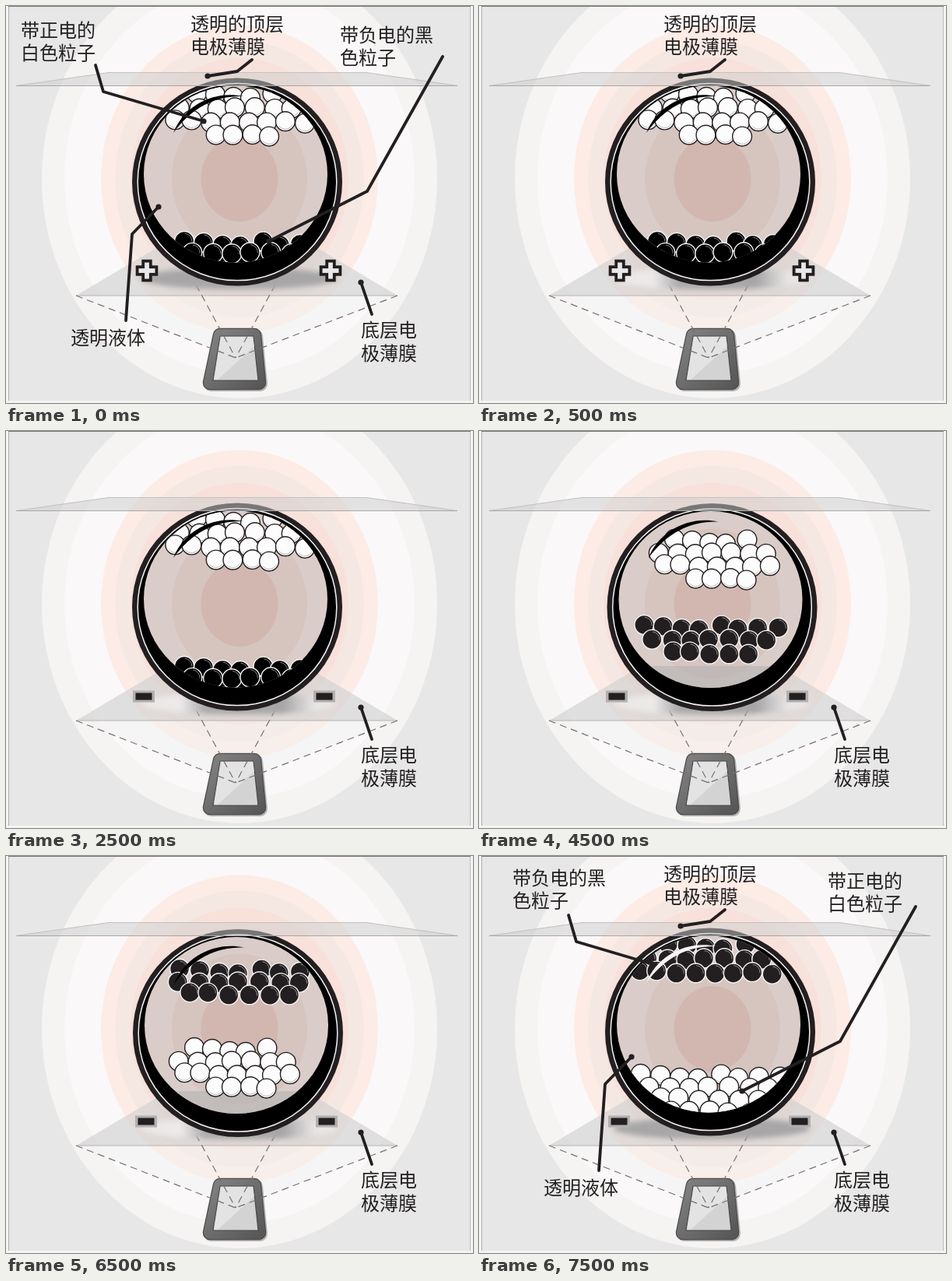
These frames come from a looping animation (600 px wide and 510 px high, 8000 ms). An HTML page with a canvas:

```html
<!DOCTYPE html>
<html lang="zh-CN">
<head>
<meta charset="utf-8">
<title>电子墨水微胶囊</title>
<style>
html, body { margin: 0; width: 100%; height: 100%; overflow: hidden; background: #f4f4f4; }
canvas { display: block; width: 600px; height: 510px; }
</style>
</head>
<body>
<canvas id="stage" width="600" height="510"></canvas>
<script>
const g = document.getElementById('stage').getContext('2d');
const INK = '#231f20';
const LOOP = 8000;

// Seeded noise in -1..1
const noise = n => {
  const v = Math.sin(n * 127.1 + 11.7) * 43758.5453;
  return (v - Math.floor(v)) * 2 - 1;
};

// Loose rows of particles, one count per row, each row centred on x
function heap(x, y, counts, { pitch = 24, gap = 17, lean = 0 } = {}) {
  return counts.flatMap((n, row) => Array.from({ length: n }, (_, i) => ({
    x: x + row * lean + (i - (n - 1) / 2) * pitch + noise(row * 17 + i) * 2.5,
    y: y + row * gap + noise(row * 31 + i + 5) * 4
  })));
}

const shift = (pts, dx, dy) => pts.map(p => ({ x: p.x + dx, y: p.y + dy }));

const whiteMid = heap(296, 141, [5, 7, 7, 4], { pitch: 23, lean: 5 });
const blackMid = heap(297, 251, [8, 7, 5], { pitch: 24.5, gap: 18 });
const START = {
  white: heap(292, 114, [5, 7, 8, 4], { lean: 4, gap: 18 }),
  black: heap(303, 304, [7, 6], { pitch: 25, gap: 14 }),
  sign: 'plus', packed: true
};
const SCENES = [
  { at: 0, ...START, labels: 'all' },
  { at: 500, ...START, labels: 'top' },
  { at: 1500, ...START, labels: 'bottom' },
  { at: 2500, ...START, sign: 'minus', labels: 'bottom' },
  { at: 4500, white: whiteMid, black: blackMid, sign: 'minus', labels: 'bottom', dx: 2.5, dy: 0.5 },
  { at: 5500, white: shift(whiteMid, -5, 54), black: shift(blackMid, 0, -54),
    sign: 'minus', labels: 'bottom', dx: 1.5, dy: 1 },
  { at: 6500, white: shift(whiteMid, -9, 107),
    black: heap(300, 147, [7, 7, 6], { pitch: 26, gap: 16 }),
    sign: 'minus', signDx: 3, labels: 'bottom', dx: 1, dy: 1.5 },
  { at: 7500, white: heap(296, 282, [8, 7, 6, 5], { pitch: 25.5, gap: 16 }),
    black: heap(291, 115, [5, 7, 8], { pitch: 24.5, gap: 18 }),
    sign: 'minus', signDx: 3, labels: 'all', swapped: true }
];

function trace(pts, close) {
  g.beginPath();
  for (let i = 0; i < pts.length; i += 2) g.lineTo(pts[i], pts[i + 1]);
  if (close) g.closePath();
}

function poly(pts, fill, stroke, width = 1) {
  trace(pts, true);
  if (fill) { g.fillStyle = fill; g.fill(); }
  if (stroke) { g.strokeStyle = stroke; g.lineWidth = width; g.stroke(); }
}

function line(pts, color, width, dash = []) {
  trace(pts);
  g.strokeStyle = color;
  g.lineWidth = width;
  g.setLineDash(dash);
  g.stroke();
  g.setLineDash([]);
}

function oval(x, y, rx, ry, fill) {
  g.beginPath();
  g.ellipse(x, y, rx, ry, 0, 0, Math.PI * 2);
  g.fillStyle = fill;
  g.fill();
}

function box(x, y, w, h, fill) {
  g.fillStyle = fill;
  g.fillRect(x - w / 2, y - h / 2, w, h);
}

const ring = (r, color) => oval(300, 222, r, r * 1.11, color);

function backdrop() {
  box(300, 255, 600, 510, '#f4f4f4');
  box(300, 253.5, 594, 507, '#e7e7e7');
  g.save();
  g.beginPath();
  g.rect(3, 0, 594, 507);
  g.clip();
  ring(254, '#f6f3f3');
  ring(225, '#faf8f8');
  ring(178, '#fcece5');
  ring(160, '#f5e8e3');
  ring(140, '#f7e1da');
  g.restore();
  line([3.5, 0, 3.5, 507], '#adadad', 1);
  line([596.5, 0, 596.5, 507], '#bcbcbc', 1);
  line([3, 0.5, 597, 0.5], '#777', 1);
}

function lowerFilm() {
  poly([90, 372, 503, 372, 295, 452], 'rgba(240,240,240,.4)');
  poly([90, 372, 208, 302, 385, 302, 503, 372], 'rgba(208,208,208,.62)');
  line([90, 372, 503, 372], '#b5b5b5', 1);
}

function shadow(faded) {
  let fill = '#a8a7a7';
  if (faded) {
    fill = g.createLinearGradient(172, 0, 428, 0);
    fill.addColorStop(0, 'rgba(245,243,243,.5)');
    fill.addColorStop(0.2, 'rgba(238,236,236,.9)');
    fill.addColorStop(0.33, '#aaa');
    fill.addColorStop(0.72, '#a6a6a6');
    fill.addColorStop(0.88, 'rgba(232,230,230,.9)');
    fill.addColorStop(1, 'rgba(245,243,243,.5)');
  }
  g.save();
  g.filter = 'blur(3px)';
  oval(299, 350, 126, 14, fill);
  g.restore();
}

function rays() {
  for (const [x, y] of [[90, 372], [503, 372], [237, 345], [353, 345]]) {
    line([x, y, 295, 452], '#77706f', 1.2, [9, 6]);
  }
}

function phone() {
  const shell = [275, 423, 319, 423, 325, 484, 262, 484];
  const body = g.createLinearGradient(255, 415, 330, 492);
  body.addColorStop(0, '#858585');
  body.addColorStop(1, '#555');
  g.lineJoin = 'round';
  poly(shell.map(v => v + 1.5), null, 'rgba(80,80,80,.4)', 19);
  poly(shell, '#4b4b4b', '#4b4b4b', 18.5);
  poly(shell, body, body, 16);
  poly([275, 424, 318, 424, 324, 481, 266, 481], '#d3d3d3', '#4a4a4a', 1.2);
  poly([276, 425, 317, 425, 319, 437, 272, 480, 267, 480], 'rgba(238,238,238,.6)');
  g.lineJoin = 'miter';
}

function particles(pts, fill, edge, shine) {
  for (const { x, y } of pts) {
    oval(x, y, 12.4, 12.4, fill);
    g.strokeStyle = edge;
    g.lineWidth = 1.4;
    g.stroke();
    g.beginPath();
    if (shine) g.arc(x, y, 9.8, -1.5, 0.1);
    else g.arc(x, y, 10, 0.5, 2.5);
    g.strokeStyle = shine ? '#a9a6a6' : '#aaa';
    g.lineWidth = 0.8;
    g.stroke();
  }
}

function swoosh(color) {
  g.beginPath();
  g.moveTo(215, 163);
  g.bezierCurveTo(229, 127, 268, 108, 305, 116);
  g.bezierCurveTo(270, 115, 240, 129, 215, 163);
  g.fillStyle = color;
  g.fill();
}

function capsule({ white, black, packed, swapped, dx = 0, dy = 0 }) {
  g.save();
  g.translate(dx, dy);
  oval(297, 226, 135, 133.5, INK);
  oval(297, 226, 127.8, 126.6, '#000');
  g.strokeStyle = '#f2f2f2';
  g.lineWidth = 1.5;
  g.stroke();

  g.save();
  oval(295, 216, 118, 113.5, '#dacdc9');
  g.clip();
  g.translate(-dx, -dy);
  ring(87, '#d6c4be');
  ring(49.5, '#d2b7b0');
  if (packed) {
    poly([170, 280, 215, 306, 228, 316, 372, 316, 385, 303, 425, 275, 425, 340, 170, 340], '#000');
  } else {
    poly([208, 302, 385, 302, 420, 340, 170, 340], 'rgba(178,178,178,.6)');
  }
  const drawWhite = () => particles(white, '#fdfcfc', INK, false);
  if (swapped) drawWhite();
  particles(black, packed ? '#000' : INK, '#f4f2f2', true);
  if (!swapped) drawWhite();
  g.restore();

  swoosh(swapped ? '#f6f4f4' : '#000');
  g.restore();
}

function upperFilm() {
  poly([13, 102.5, 132, 85.5, 463, 85.5, 580, 102.5], 'rgba(205,205,205,.5)', '#c2c0c0', 1);
  line([13, 102.5, 580, 102.5], '#a9a7a7', 1.2);
}

function plus(x, y) {
  box(x, y, 13.4, 28.6, INK);
  box(x, y, 28.6, 13.4, INK);
  box(x, y, 5.8, 21, '#e9e7e7');
  box(x, y, 21, 5.8, '#e9e7e7');
}

function minus(x, y) {
  box(x, y, 28, 15, '#b2b0b0');
  box(x, y, 21, 9, INK);
}

function signs({ sign, signDx = 0 }) {
  if (sign === 'plus') { plus(181, 340); plus(417, 340); }
  else { minus(177 + signDx, 341); minus(409 + signDx, 341); }
}

// Text rows and a leader line that ends in a dot
function note(rows, x, y, lead) {
  g.fillStyle = INK;
  rows.forEach((row, i) => g.fillText(row, x, y + i * 29.7));
  g.lineCap = g.lineJoin = 'round';
  line(lead, INK, 3.8);
  g.lineCap = 'butt';
  g.lineJoin = 'miter';
  const [dotX, dotY] = lead.slice(-2);
  oval(dotX, dotY, 3.6, 3.6, INK);
}

function labels(s) {
  const all = s.labels === 'all';
  const white = ['带正电的', '白色粒子'], black = ['带负电的黑', '色粒子'];
  g.font = '24px "Noto Sans CJK SC", "Noto Sans CJK", sans-serif';
  if (all || s.labels === 'top') {
    note(['透明的顶层', '电极薄膜'], 237, 31.5, [316, 69, 297, 84, 259, 90]);
  }
  if (all || s.labels === 'bottom') {
    note(['底层电', '极薄膜'], 456, 425, [470, 396, 456, 355]);
  }
  if (!all) return;
  note(['透明液体'], 83, 434.5, [154, 404, 162, 293, 196, 258]);
  const right = [561, 65, 464, 238, 338, 302];
  if (s.swapped) {
    note(black, 43, 36.5, [115, 76, 125, 110, 223, 139]);
    note(white, 448, 40.5, right);
  } else {
    note(white, 19, 39.5, [115, 76, 125, 110, 254, 148]);
    note(black, 429, 45.5, right);
  }
}

function draw(t) {
  const s = SCENES.findLast(scene => t >= scene.at);
  backdrop();
  lowerFilm();
  phone();
  rays();
  shadow(s.labels !== 'all');
  capsule(s);
  upperFilm();
  signs(s);
  labels(s);
}

let begin;
function tick(now) {
  if (begin === undefined) begin = now;
  draw(Math.max(0, now - begin) % LOOP);
  requestAnimationFrame(tick);
}
requestAnimationFrame(tick);
</script>
</body>
</html>
```
